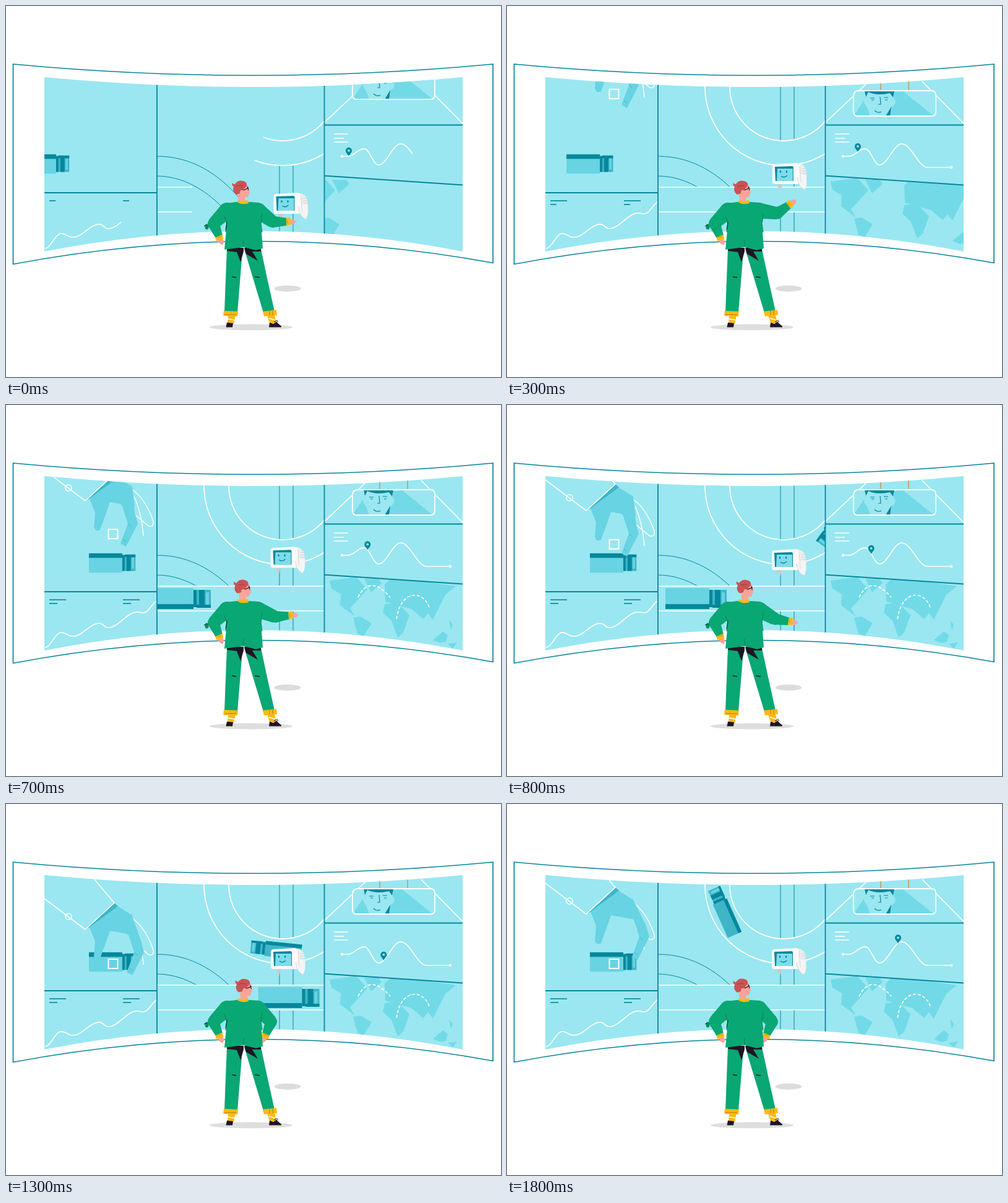
Recreate the animation shown at these times as an HTML page with a canvas. Size 800x600 px, loop 1.9 s.

```html
<!DOCTYPE html>
<html lang="en">
<head>
<meta charset="utf-8">
<title>Control room</title>
<style>
  html, body { margin: 0; width: 100%; height: 100%; overflow: hidden; background: #fff; }
  canvas { display: block; }
</style>
</head>
<body>
<canvas id="stage" width="800" height="600"></canvas>
<script>
const ctx = document.getElementById('stage').getContext('2d');
const LOOP = 1900, STEP = 100, RAD = Math.PI / 180;
const CYAN = '#9ae7f1', LAND = '#72dae7', MID = '#68d3e2', DEEP = '#3fb5c7', TEAL = '#07879c';
const GREEN = '#09a773', SHADE = '#0a8a60', YELLOW = '#fdba14', SKIN = '#f9a49b', HAIR = '#cb5254', INK = '#1f1523';
const SCREEN = 'M62 115Q400 147 738 115V397Q400 331 62 397Z';
let t = 0;

// Progress from 0 to 1 between two times
const during = (a, b) => Math.min(1, Math.max(0, (t - a) / (b - a)));

// Value at x through a few [x, y] points, with flat turning points if smooth
function through(points, x, smooth) {
  const i = Math.max(1, points.findIndex((p, n) => p[0] >= x || n === points.length - 1));
  const [[x0, y0], [x1, y1]] = [points[i - 1], points[i]];
  const f = Math.min(1, Math.max(0, (x - x0) / (x1 - x0)));
  return y0 + (y1 - y0) * (smooth ? (1 - Math.cos(Math.PI * f)) / 2 : f);
}

function fill(color, d) {
  ctx.fillStyle = color;
  ctx.fill(new Path2D(d));
}

function line(color, width, d) {
  ctx.strokeStyle = color;
  ctx.lineWidth = width;
  ctx.stroke(new Path2D(d));
}

function rect(color, x, y, w, h) {
  ctx.fillStyle = color;
  ctx.fillRect(x, y, w, h);
}

function oval(color, x, y, rx, ry = rx) {
  ctx.fillStyle = color;
  ctx.beginPath();
  ctx.ellipse(x, y, rx, ry, 0, 0, 7);
  ctx.fill();
}

function arc(color, width, x, y, r, end) {
  ctx.strokeStyle = color;
  ctx.lineWidth = width;
  ctx.beginPath();
  ctx.arc(x, y, r, 0, end);
  ctx.stroke();
}

function graph(points, end) {
  let d = `M${points[0]}`;
  for (let x = points[0][0]; x <= end; x++) d += `L${x} ${through(points, x, true)}`;
  line('#fff', 1.7, d);
}

function at(x, y, draw, angle = 0, sx = 1, sy = sx) {
  ctx.save();
  ctx.translate(x, y);
  ctx.rotate(angle);
  ctx.scale(sx, sy);
  draw();
  ctx.restore();
}

function clip(d, draw) {
  ctx.save();
  ctx.clip(new Path2D(d));
  draw();
  ctx.restore();
}

// Truck from above, its front at the origin, heading right
function truck(body) {
  rect(body, -100, -17, 71, 34);
  rect(TEAL, -100, 9, 71, 8);
  rect(DEEP, -29, -14, 28, 28);
  for (const [x, w] of [[-29, 5], [-20, 9]]) rect(TEAL, x, -14, w, 28);
  rect(MID, -9, -10, 5, 20);
  rect(TEAL, -24, 10, 23, 5);
}

function handPanel() {
  at(210 - 107 * (1 - during(0, 600)) ** 1.5, 255.5, () => truck(MID), 0, 0.76, -0.92);
  const open = 17 * during(1000, 1500);
  at(0, 160 * during(0, 1000) - 160 - 25 * during(1500, 1800), () => {
    line('#fff', 1.5, 'M203 184Q224 198 237 233Q241 246 231 244L209 226M207 196Q219 222 222 260');
    fill(MID, 'M133 194L175 162L204 180L208 212L168 205L160 228L152 250Q145 254 142 246L144 222Z');
    at(open, 0, () => {
      fill(MID, `M${203 - open} 178L208 222L213 240L194 277L185 272L197 240L188 212L${180 - open} 200Z`);
      line(DEEP, 1, 'M197 240L203 245M189 265L194 269');
    });
    fill(DEEP, 'M128 203L175 160L181 165L134 200Z');
    const sleeve = 'M40 136L62 153L128 203L175 160L143 122L100 80';
    fill(CYAN, sleeve);
    line('#fff', 1.6, sleeve);
    arc('#fff', 1.6, 101, 182, 5, 7);
  });
  ctx.strokeStyle = '#fff';
  ctx.lineWidth = 2;
  ctx.strokeRect(165.5, 85 + 166 * during(0, 1000), 15, 15);
}

function chartPanel() {
  const trend = [[63, 392], [89, 368], [108, 374], [151, 353], [165, 360], [212, 335], [222, 336], [247, 316]];
  graph(trend, 186 + 58 * during(0, 200));
  for (const x of [70, 189]) {
    rect(TEAL, x, 314.2, 10 + 17 * during(0, 200), 1.6);
    rect(TEAL, x, 320.2, 13 * during(0, 400), 1.6);
  }
}

function roadPanel() {
  const top = 258 - 130 * during(0, 200), end = 301 + 214 * during(0, 200);
  line(TEAL, 1, `M244 243C300 243 345 272 380 314M244 275C285 275 322 297 350 326M442 ${top}V368M464 ${top}V368`);
  const sweep = (111 + 79 * during(0, 200)) * RAD;
  arc(CYAN, 40, 447, 131, 107, sweep);
  for (const r of [87, 127]) arc('#fff', 1.8, 447, 131, r, sweep);
  rect(CYAN, 244, 293, end - 244, 40);
  line('#fff', 1.7, `M244 293H${end}M244 333H${end}`);
  at(through([[300, 236], [800, 356], [1000, 428], [1800, 640]], t), 313, () => truck(MID));
  if (t > 500) {
    at(447, 131, () => {
      ctx.translate(105, 0);
      ctx.rotate(Math.PI / 2);
      ctx.scale(0.83, 0.72);
      ctx.translate(50, 0);
      truck(DEEP);
    }, (36 + 0.12 * (t - 800)) * RAD);
  }
}

function mirrorPanel() {
  line('#fff', 1.7, 'M514 189L585 122M671 122L738 190');
  at(0, 27 * during(0, 200) - 27, () => {
    line('#c5a878', 2, 'M604 110V137M649 110V137');
    const glass = 'M568 137H686Q693 137 693 144V171Q693 178 686 178H567Q560 178 560 171V147Q560 137 568 137Z';
    fill(CYAN, glass);
    clip(glass, () => {
      fill(LAND, 'M560 178L584 142L640 138L690 178Z');
      fill(CYAN, 'M580 139H625V150Q630 153 626 160L621 164Q618 171 612 178H587L582 164Q576 158 577 151L580 149Z');
      fill(TEAL, 'M578 137H626L624 148L619 141Q598 146 584 139L580 147Z');
      fill(TEAL, 'M621 163L619 178H612Z');
      line(TEAL, 1.2, 'M587 149H594M589 152H593M609 148H616M611 152H615M603 147L604 159H600M594 169Q599 174 605 171');
    });
    line('#fff', 1.8, glass);
  });
}

function routePanel() {
  line('#fff', 1.6, 'M530 207H553M530 214H546M530 220H553');
  const route = [[543, 243], [552, 243], [579, 231], [602, 257], [638, 223], [680, 261], [718, 261]];
  graph(route, 657 + 61 * during(0, 200));
  oval('#fff', 543, 243, 2.3);
  if (t > 100) rect('#fff', 716, 259, 4, 4);
  const x = 554 + 78 * during(0, 1800);
  at(x, through(route, x, true), () => {
    fill(TEAL, 'M0 0C-2 -4 -5 -5 -5 -9A5 5 0 0 1 5 -9C5 -5 2 -4 0 0Z');
    oval(CYAN, 0, -9, 1.9);
  });
}

function mapPanel() {
  // The two halves of the world slide in from either side
  at(-52 * (1 - during(0, 250)), 0, () => {
    fill(LAND, 'M523 284L566 278L584 298L566 318L556 329L564 342L540 324L541 306L526 297Z');
    fill(LAND, 'M579 281L602 281L607 288L590 303Z');
    fill(LAND, 'M561 344L573 342L591 353L578 374L568 370Z');
  });
  at(210 * (1 - during(0, 350)), 0, () => {
    fill(LAND, 'M612 290L622 281L678 286L727 293L710 307L690 347L682 337L674 346L655 330L613 318Z');
    fill(LAND, 'M612 322L633 320L652 340L642 368L633 376L623 349L609 336Z');
    fill(LAND, 'M690 380L706 366L714 372L711 383L702 385Z');
    fill(LAND, 'M716 348L722 355L719 365ZM714 386L729 384L722 394Z');
  });
  const grown = during(300, 700);
  ctx.setLineDash([5, 3]);
  clip(`M565 280h${58 * grown}V330H565Z`, () => line('#fff', 1.8, 'M569 311Q588 273 621 311'));
  clip(`M687 290h${-60 * grown}V355H687Z`, () => line('#fff', 1.8, 'M684 327C673 297 636 300 631 348'));
  ctx.setLineDash([]);
}

function wall() {
  line(TEAL, 1.7, 'M11.5 94Q400 130.5 787 94V415.5Q400 344.5 11.5 417.5Z');
  fill(CYAN, SCREEN);
  clip(SCREEN, () => {
    clip('M62 110H244V302H62Z', handPanel);
    clip('M62 302H244V400H62Z', chartPanel);
    clip('M244 110H514V400H244Z', roadPanel);
    clip('M514 110H738V192H514Z', mirrorPanel);
    clip('M514 192H738V289L514 274Z', routePanel);
    clip('M514 274L738 289V400H514Z', mapPanel);
    line(TEAL, 1.8, 'M244 120V380M514.5 120V380M62 302H244M514 192.5H738M514 274.5L738 289.5');
  });
}

function robot() {
  oval('#dcdcdc', 455, 457, 21.5, 5);
  const rise = during(0, 500), settle = during(500, 800);
  at(432.5 - 6 * rise + 1.5 * settle, 303 - 80 * rise + 11 * settle, () => {
    fill('#c9cccf', 'M7 32H16L14 42Q9 41 7 32Z');
    fill('#ececee', 'M36 0H44Q51 1 54 9L56 22L50 30H36Z');
    fill('#fafafa', 'M4 1L38 -1Q43 -1 44 3L46 29Q46 33 41 33H4Q0 33 0 29V6Q0 1 4 1Z');
    for (let y = 8; y < 17; y += 4) line('#d2d4d8', 1, `M48 ${y}H56`);
    fill('#f5f5f6', 'M40 22Q46 14 54 19Q58 32 52 42Q42 38 40 22Z');
    line('#d2d4d8', 0.9, 'M44 4L46 30M40 22Q42 38 52 42');
    fill(TEAL, 'M4 5L32 4Q34 4 34 7V28H5Z');
    fill('#7fdcea', 'M8 8H33V28H7Z');
    line(TEAL, 1.4, 'M14 20Q19 24 24 19');
    for (const x of [13, 23]) oval(TEAL, x, 13, 1.2, 2);
  });
}

// Tapered limb; returns its far end
function limb(x, y, angle, length, r0, r1) {
  at(x, y, () => {
    oval(GREEN, 0, 0, r0);
    fill(GREEN, `M0 ${-r0}L${length} ${-r1}V${r1}L0 ${r0}Z`);
  }, angle * RAD);
  return [x + length * Math.cos(angle * RAD), y + length * Math.sin(angle * RAD)];
}

function arm(upper, fore) {
  const elbow = limb(407, 331, upper, 30, 13, 10);
  const wrist = limb(...elbow, fore, 23, 9.5, 6);
  at(...wrist, () => {
    fill(SKIN, 'M4 -4L10 -4L15 0L11 4H4Z');
    fill(YELLOW, 'M-1 -6L5 -7L6 5L-1 6Z');
    line('#d98e05', 0.9, 'M1 -3V3');
  }, fore * RAD);
}

function head() {
  const turn = during(600, 800) - during(1500, 1700);
  at(378 + 4.5 * turn, 297, () => {
    fill(SKIN, 'M-4 3L7 -10L13 -7L16 4L13 12L8 13L9 19L-2 20Z');
    fill(HAIR, 'M-6 8Q-13 3 -10 -5Q-14 -7 -12 -11Q-10 -8 -8 -9Q-3 -16 5 -14Q12 -13 11 -6L8 -3L6 1L1 1L0 6Z');
    oval(SKIN, 3, 5, 2.8, 3.4);
    line('#a03d44', 1, 'M-6 -5Q0 -8 5 -6');
    line(INK, 1.1, 'M6 1L14 -3M12 -5L14 1');
  }, 0.08 * turn);
}

function man() {
  oval('#dedede', 396, 519.5, 67, 5);
  fill(YELLOW, 'M359 500H371L368 514H358ZM422 500H434L437 513H426Z');
  line('#fff', 1.6, 'M358 506L370 508M425 505L435 508');
  fill(INK, 'M357 512L367 513L366 519.5H355.5ZM426 512L432 514L437 511L445 518V519.5H425Z');
  line(INK, 1, 'M433 511L439 508M436 512L440 510');
  // Trousers
  fill(GREEN, 'M357 393H383L381 410L374 496H353Q355 440 357 393ZM385 393H412L422 440L434 494L416 496Z');
  fill(INK, 'M357 391H384V397L379 414L373 398L357 396ZM385 391H412V397H398L407 412L388 401Z');
  line(INK, 1.5, 'M365 438L372 439M402 438L410 439');
  fill(YELLOW, 'M352 493L375 494L374 502L351 501ZM415 494L437 491.5L438 500L417 502Z');
  line('#b87505', 1, 'M353 499H372M426 493V500M431 493V500');
  // Left hand rests on the hip; the right one lifts, drops and joins it
  at(764, 0, () => arm(44, 113), 0, -1, 1);
  const lift = during(0, 200), drop = during(500, 800), rest = during(800, 1000);
  arm(37 - 29 * lift + 22 * drop + 14 * rest, -35 * lift + 45 * drop + 103 * rest);
  fill(GREEN, 'M356 319L372 317H394L409 318L415 340L412 352L415 392L404 395L384 390L353 394L357 352L350 338Z');
  oval(SHADE, 324.5, 357, 3, 4.5);
  line(SHADE, 1.2, 'M353 340L357 352L355 366M414 336L412 352L414 366M384 378V390');
  line(INK, 1, 'M320 356L324 354M357 349L355 362');
  head();
  fill(YELLOW, 'M374 314Q383 318 391 313L392 319Q382 322 375 318Z');
}

function frame(now) {
  t = Math.floor(now % LOOP / STEP) * STEP;
  rect('#fff', 0, 0, 800, 600);
  wall();
  robot();
  man();
}

const start = performance.now();
(function tick() {
  frame(performance.now() - start);
  requestAnimationFrame(tick);
})();
</script>
</body>
</html>
```
